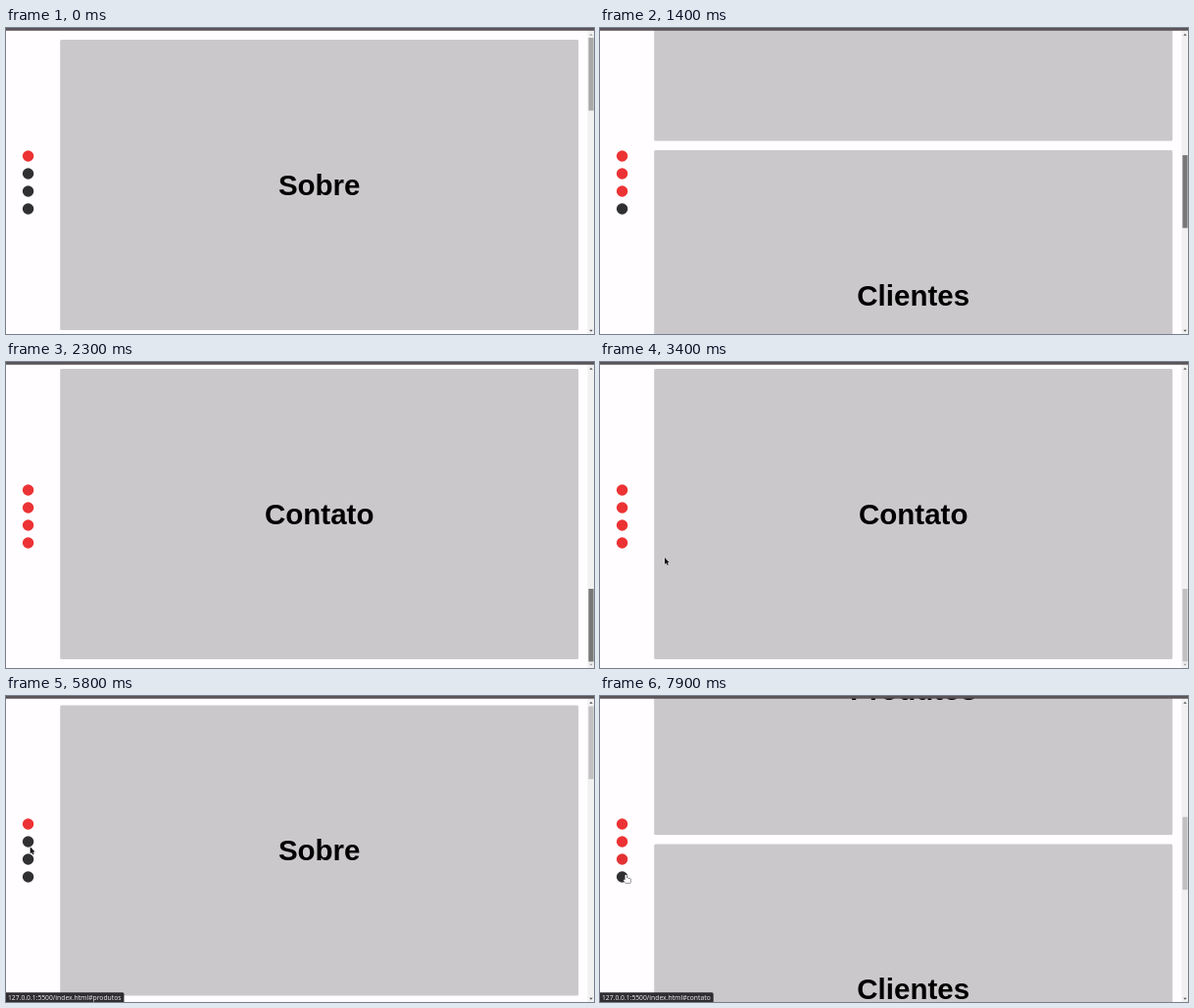
Write an HTML page with a canvas that moves like this. It is 600x313 px and loops after 8 s.

```html
<!DOCTYPE html>
<html lang="pt">
<head>
<meta charset="utf-8">
<title>Scroll navigation</title>
<style>
html, body { margin: 0; width: 100%; height: 100%; overflow: hidden; background: #fffdff; }
canvas { display: block; width: 600px; height: 313px; }
</style>
</head>
<body>
<canvas id="stage"></canvas>
<script>
const W = 600, H = 313, LOOP = 8000, STEP = 100;
const TITLES = ['Sobre', 'Produtos', 'Clientes', 'Contato'];
const TOP = 12, BOX_H = 297, PITCH = 306.6, MAX_SCROLL = 924.8;
const DOT_X = 22.6, DOT_Y = 131, DOT_GAP = 18, FADE = 120;
const DARK = [48, 47, 50], RED = [236, 50, 52];

// dragging the scrollbar: time, scroll
const DRAG = [[100, 0], [200, 4], [300, 15], [400, 25], [780, 25], [900, 168.2],
  [1800, 765.8], [2000, 862], [2300, MAX_SCROLL]];
// clicks on the dots: start, duration, from, to
const JUMPS = [
  [4814, 720, MAX_SCROLL, 2.5],
  [6420, 440, 2.5, 2.5 + PITCH],
  [7678, 620, 2.5 + PITCH, MAX_SCROLL]
];
// pointer: time, x, y
const POINTER = [[2600, 588, 255], [2700, 480, 190], [2800, 340, 140], [2900, 210, 140],
  [3000, 110, 165], [3100, 50, 192], [3200, 24, 205], [3300, 45, 203], [3400, 66, 200],
  [3600, 58, 176], [3800, 36, 142], [4000, 25, 132], [4300, 24, 133], [4400, 26, 133],
  [4600, 21, 130.5], [5700, 21, 130.5], [5800, 24.7, 154.3], [6000, 24, 151], [6300, 23, 148],
  [6600, 23, 148], [6900, 25, 167], [7200, 25, 182], [7300, 25, 183], [7400, 26.5, 182.5]];
// link shown in the status bubble: time, section
const LINKS = [[3900, 0], [5800, 1], [6900, 2], [7000, 3]];

const cv = document.getElementById('stage');
const dpr = window.devicePixelRatio || 1;
cv.width = W * dpr;
cv.height = H * dpr;
const g = cv.getContext('2d');
g.scale(dpr, dpr);

function along(keys, t) {
  if (t <= keys[0][0]) return keys[0].slice(1);
  for (let i = 1; i < keys.length; i++) {
    const a = keys[i - 1], b = keys[i];
    if (t <= b[0]) {
      const p = (t - a[0]) / (b[0] - a[0]);
      return a.slice(1).map((v, k) => v + (b[k + 1] - v) * p);
    }
  }
  return keys[keys.length - 1].slice(1);
}

// cubic-bezier(.42, 0, .58, 1)
function easeInOut(x) {
  if (x <= 0) return 0;
  if (x >= 1) return 1;
  let lo = 0, hi = 1;
  for (let i = 0; i < 24; i++) {
    const u = (lo + hi) / 2, v = 1 - u;
    if (1.26 * v * v * u + 1.74 * v * u * u + u * u * u < x) lo = u; else hi = u;
  }
  return lo * lo * (3 - 2 * lo);
}

function scrollAt(t) {
  for (let i = JUMPS.length - 1; i >= 0; i--) {
    const [start, dur, from, to] = JUMPS[i];
    if (t >= start) return from + (to - from) * easeInOut((t - start) / dur);
  }
  return along(DRAG, t)[0];
}

// share of the last FADE ms in which the dot was active
function dotLevel(i, t) {
  if (i === 0) return 1;
  const n = 24, limit = 40 + PITCH * (i - 1);
  let sum = 0;
  for (let k = 0; k < n; k++) sum += scrollAt(t - FADE * k / n) > limit;
  return sum / n;
}

function rect(x, y, w, h, r, fill) {
  g.fillStyle = fill;
  g.beginPath();
  g.roundRect(x, y, w, h, r);
  g.fill();
}

function poly(pts, fill) {
  g.fillStyle = fill;
  g.beginPath();
  pts.forEach(([x, y]) => g.lineTo(x, y));
  g.closePath();
  g.fill();
}

function drawSections(s) {
  g.font = 'bold 29.5px "Liberation Sans", Arial, sans-serif';
  g.textAlign = 'center';
  TITLES.forEach((title, i) => {
    const y = TOP + PITCH * i - s;
    if (y > H || y + BOX_H < 0) return;
    rect(55.2, y, 529, BOX_H, 1.5, '#cbc8cb');
    g.fillStyle = '#000';
    g.fillText(title, 319.7, y + BOX_H / 2 + 10.2);
  });
}

function drawDots(t) {
  TITLES.forEach((_, i) => {
    const p = dotLevel(i, t);
    const c = DARK.map((v, k) => Math.round(v + (RED[k] - v) * p));
    g.fillStyle = `rgb(${c})`;
    g.beginPath();
    g.arc(DOT_X, DOT_Y + DOT_GAP * i, 5.7, 0, 7);
    g.fill();
  });
}

function drawScrollbar(s, t) {
  rect(593.5, 0, 6.5, H, 0, '#f1f1f1');
  const tone = t < 200 ? '#a8a8a8' : t < 2500 ? '#787878' : t < 2700 ? '#a8a8a8' : '#c1c1c1';
  rect(594.4, 10 + s * 222 / MAX_SCROLL, 5.2, 74.5, 0, tone);
  poly([[595.3, 7.7], [597, 5.7], [598.7, 7.7]], s > 0 ? '#505050' : '#a3a3a3');
  poly([[595.3, 308.8], [597, 310.8], [598.7, 308.8]], s < MAX_SCROLL ? '#505050' : '#a3a3a3');
}

function drawStatus(t) {
  const link = LINKS.filter(l => l[0] <= t).pop();
  if (!link) return;
  const text = '127.0.0.1:5500/index.html#' + TITLES[link[1]].toLowerCase();
  g.font = '6.75px "Noto Sans", "Open Sans", sans-serif';
  g.textAlign = 'left';
  rect(0, 303.3, g.measureText(text).width + 5, 10, [0, 1.5, 0, 0], '#2f2d31');
  g.fillStyle = '#e6e4e6';
  g.fillText(text, 2, 311);
}

function drawPointer(t) {
  if (t < POINTER[0][0]) return;
  const [x, y] = along(POINTER, t);
  const onDot = TITLES.some((_, i) => Math.hypot(x - DOT_X, y - DOT_Y - DOT_GAP * i) < 5.3);
  g.save();
  g.translate(x, y);
  g.lineJoin = 'round';
  const path = new Path2D(onDot
    ? 'M-1 .8Q0-.4 1 .8V3.6L4.6 4.5Q5.2 5 5 6L4.2 9H-.4L-2.8 5.8Q-2.6 4.6-1 5.6Z'
    : 'M0 0V7L1.6 5.6L2.7 8L3.8 7.5L2.8 5.2H4.8Z');
  g.lineWidth = onDot ? .8 : 1;
  g.strokeStyle = onDot ? '#111' : '#eee';
  g.fillStyle = onDot ? '#fff' : '#111';
  g.stroke(path);
  g.fill(path);
  g.restore();
}

function draw(t) {
  const s = scrollAt(t);
  rect(0, 0, W, H, 0, '#fffdff');
  drawSections(s);
  drawDots(t);
  drawScrollbar(s, t);
  rect(0, 0, W, 2.7, 0, '#5a5458');
  drawStatus(t);
  drawPointer(t);
}

const begin = performance.now();
function tick() {
  const t = (performance.now() - begin) % LOOP;
  draw(Math.floor(t / STEP) * STEP);
  requestAnimationFrame(tick);
}
tick();
</script>
</body>
</html>
```
